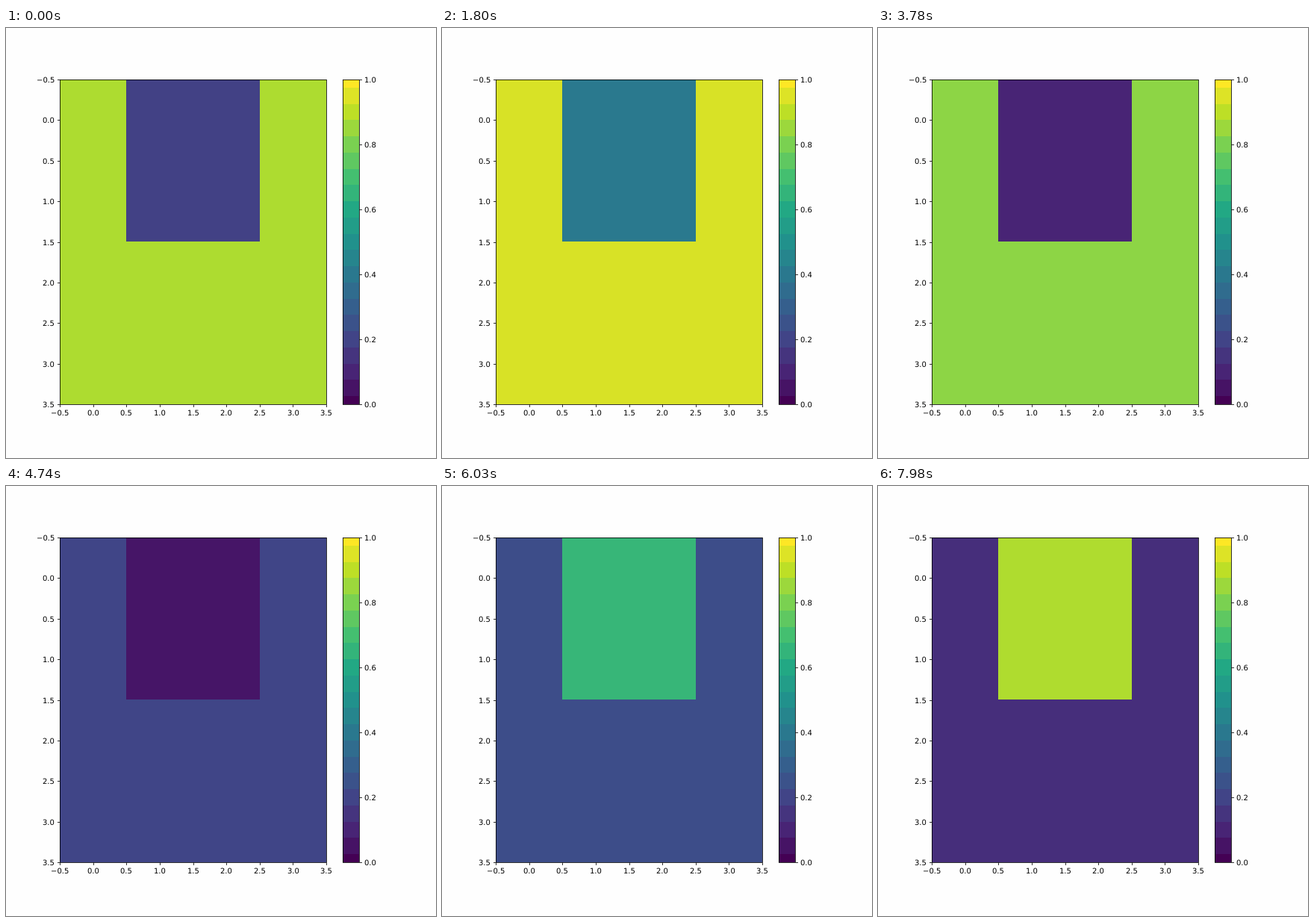
These frames come from a looping animation (576x576 px, 8 s). An HTML page with a canvas:

```html
<!DOCTYPE html>
<html lang="en">
<head>
<meta charset="utf-8">
<title>Two oscillating regions</title>
<style>
  html, body { margin: 0; height: 100%; overflow: hidden; background: #fefefe; }
  canvas { display: block; }
</style>
</head>
<body>
<canvas id="stage" width="576" height="576"></canvas>
<script>
const ctx = document.getElementById('stage').getContext('2d');
const LOOP = 8000, STEP = 30;
const LEFT = 72, TOP = 69, RIGHT = 429, BOTTOM = 504;
const BAR_LEFT = 451, BAR_RIGHT = 473;
const BANDS = 20;

// Evenly spaced key colours of the viridis map
const VIRIDIS = ['#440154', '#482475', '#414487', '#355f8d', '#2a788e', '#21918c',
  '#22a884', '#44bf70', '#7ad151', '#bddf26', '#fde725'];

function viridis(value) {
  const position = value * (VIRIDIS.length - 1);
  const i = Math.min(VIRIDIS.length - 2, Math.floor(position));
  const channel = (color, k) => parseInt(color.substr(1 + 2 * k, 2), 16);
  const mixed = [0, 1, 2].map(k => {
    const from = channel(VIRIDIS[i], k), to = channel(VIRIDIS[i + 1], k);
    return Math.round(from + (to - from) * (position - i));
  });
  return `rgb(${mixed})`;
}

const wave = phase => 0.5 + 0.5 * Math.cos(phase);

function fillBox(x0, y0, x1, y1, color) {
  ctx.fillStyle = color;
  ctx.fillRect(x0, y0, x1 - x0, y1 - y0);
}

function outline(x0, x1) {
  ctx.strokeRect(x0 + 0.5, TOP + 0.5, x1 - x0, BOTTOM - TOP);
}

function tick(x, y, dx, dy) {
  ctx.beginPath();
  ctx.moveTo(x + 0.5, y + 0.5);
  ctx.lineTo(x + 0.5 + dx, y + 0.5 + dy);
  ctx.stroke();
}

// anchor: 0 = left, 0.5 = centre, 1 = right; the text starts on a whole pixel
function label(value, x, baseline, anchor) {
  const text = value.toFixed(1).replace('-', '\u2212');
  ctx.fillText(text, Math.round(x - anchor * ctx.measureText(text).width), baseline);
}

function drawAxes() {
  ctx.strokeStyle = ctx.fillStyle = '#000';
  ctx.lineWidth = 0.8;
  ctx.font = '10px "DejaVu Sans", sans-serif';
  ctx.textRendering = 'geometricPrecision';
  outline(LEFT, RIGHT);
  outline(BAR_LEFT, BAR_RIGHT);

  for (let i = 0; i <= 8; i++) {
    const value = i / 2 - 0.5;
    const x = 72 + i * 44.64;
    const y = Math.round(69.12 + i * 54.36);
    tick(Math.round(x), BOTTOM, 0, 3.5);
    tick(LEFT, y, -3.5, 0);
    label(value, x, 519, 0.5);
    label(value, 65, y + 4, 1);
  }
  for (let i = 0; i <= 5; i++) {
    const y = BOTTOM - i * 87;
    tick(BAR_RIGHT, y, 3.5, 0);
    label(i / 5, 480, y + 4, 0);
  }
}

function drawColorBar() {
  const yAt = value => Math.round(BOTTOM - Math.min(1, Math.max(0, value)) * (BOTTOM - TOP));
  for (let i = 0; i <= BANDS; i++) {
    fillBox(BAR_LEFT, yAt((i + 0.5) / BANDS), BAR_RIGHT, yAt((i - 0.5) / BANDS), viridis(i / BANDS));
  }
}

function draw() {
  const step = Math.floor(performance.now() % LOOP / STEP);
  fillBox(0, 0, 576, 576, '#fefefe');
  fillBox(LEFT, TOP, RIGHT, BOTTOM, viridis(wave(0.72 + 0.1008 * step)));
  fillBox(161, TOP, 340, 286, viridis(wave(2.24 + 0.2015 * step)));
  drawColorBar();
  drawAxes();
  requestAnimationFrame(draw);
}
draw();
</script>
</body>
</html>
```
